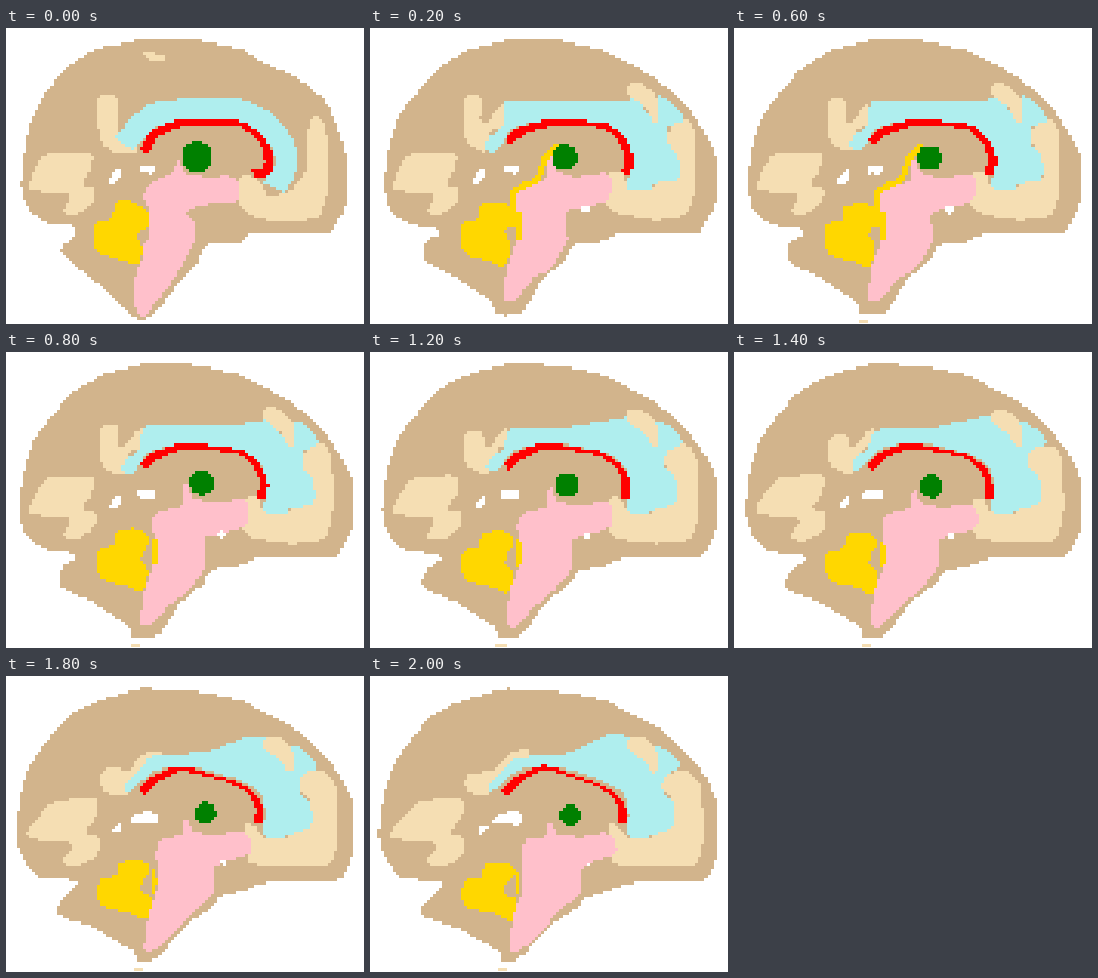
Write an HTML page with a canvas that moves like this. It is 358 px wide and 296 px high and loops after 2.2 s.

```html
<!DOCTYPE html>
<html lang="en">
<head>
<meta charset="utf-8">
<title>Brain slices</title>
<style>
html, body { margin: 0; width: 100%; height: 100%; overflow: hidden; background: #fff; }
canvas { display: block; }
</style>
</head>
<body>
<canvas id="stage" width="358" height="296"></canvas>
<script>
const ctx = document.getElementById('stage').getContext('2d');
const STEP = 200, STEPS = 11;
const TAN = '#d2b48c', WHEAT = '#f5deb3', BLUE = '#afeeee', RED = '#ff0000';
const GOLD = '#ffd700', PINK = '#ffc0cb', GREEN = '#008000', WHITE = '#ffffff';

// Voxel grid: origin and pitch on each axis.
const OX = 1.28, CX = 3.085, OY = 2.16, CY = 3.08, ROWS = 95;
const edgeX = k => Math.round(OX + CX * k);
const edgeY = k => Math.round(OY + CY * k);

const mix = (a, b, t) => a + (b - a) * t;
const box = (l, t, r, b) => [l, t, r, t, r, b, l, b];
const disc = (x, y, r) => Array.from({ length: 24 }, (_, i) =>
  (i % 2 ? y : x) + r * (i % 2 ? Math.sin : Math.cos)(Math.PI * (i >> 1) / 6));

// Key points drift between two slices, "from" and "to"; the opening slice may use "first".
// A part with a width is a ribbon around its centre line.
const parts = [
  { color: TAN,
    first: [135,12, 188,12, 235,21, 258,35, 285,47, 302,58, 320,74, 332,100, 340,130, 339,178, 330,196, 322,205, 242,206, 236,213, 200,217, 190,237, 170,258, 150,284, 134,291, 118,281, 90,254, 60,230, 55,220, 68,207, 66,198, 42,195, 22,180, 15,158, 20,112, 28,86, 42,62, 60,41, 88,22, 110,17],
    from: [140,12, 186,12, 235,23, 262,37, 286,51, 304,66, 320,83, 335,105, 346,130, 346,172, 337,192, 328,205, 250,206, 228,214, 203,217, 193,234, 172,252, 152,284, 126,286, 121,274, 84,248, 55,233, 56,212, 70,206, 64,200, 40,196, 20,182, 14.5,160, 17,128, 27,92, 44,68, 66,43, 98,22],
    to: [135,13, 190,16, 235,24, 256,36, 277,46, 296,57, 312,73, 333,97, 346,125, 347,175, 342,192, 333,204, 262,207, 240,214, 216,222, 208,231, 180,250, 152,280, 134,286, 129,276, 88,252, 50,239, 58,224, 72,208, 66,205, 32,202, 17,184, 8.5,160, 14,118, 22,92, 38,68, 58,43, 86,27] },
  { color: WHEAT,
    first: [303,92, 316,92, 323,120, 322,160, 313,188, 285,193, 258,191, 238,183, 228,160, 240,147, 256,156, 262,167, 284,163, 300,142],
    from: [303,94, 318,92, 325,108, 325,160, 316,186, 285,192, 243,184, 235,172, 237,148, 252,143, 259,160, 282,162, 286,153, 308,150, 306,128, 298,114],
    to: [298,98, 318,96, 331,110, 334,160, 325,189, 285,191, 246,188, 240,172, 240,148, 246,150, 258,161, 282,161, 288,156, 303,150, 303,126, 291,108] },
  { color: WHEAT,
    from: [24,161, 38,128, 84,126, 84,142, 77,157, 88,161, 86,174, 71,186, 58,184, 62,166],
    to: [20,160, 48,127, 90,122, 92,138, 82,157, 94,163, 92,178, 74,190, 57,186, 66,168] },
  { color: WHEAT,
    first: [92,70, 111,70, 111,98, 120,116, 132,122, 112,126, 94,112],
    from: [95,70, 111,70, 113,96, 132,77, 136,96, 119,104, 127,116, 112,124, 95,110],
    to: [97,100, 114,96, 122,95, 140,78, 160,77, 140,88, 126,106, 118,119, 98,115] },
  { color: BLUE, until: 0, width: () => 23,
    from: [118,116, 132,100, 150,86, 185,82, 230,82, 258,94, 276,115, 280,138, 268,160] },
  { color: BLUE, since: 1,
    from: [118,110, 134,97, 137,73, 200,73, 258,73, 264,66, 286,94, 289,68, 313,90, 298,100, 298,115, 308,130, 307,152, 286,155, 278,163, 258,160, 262,140, 258,116, 242,100, 195,92, 165,94, 140,103, 128,122, 118,123],
    to: [119,108, 132,95, 148,82, 200,77, 238,58, 262,62, 285,95, 287,70, 311,89, 297,98, 292,112, 303,128, 303,150, 286,159, 276,161, 258,159, 259,138, 254,118, 235,106, 200,94, 172,90, 148,95, 128,110, 119,116] },
  { color: WHEAT,
    first: [139,24, 158,28, 158,33, 140,30],
    from: [260,55, 272,56, 287,70, 287,95, 275,80, 259,66],
    to: [257,65, 272,61, 286,74, 286,96, 274,86, 258,72] },
  { color: RED, width: (u, t) => 5 - 3 * t + (5 + 2 * t) * Math.abs(2 * u - 1),
    first: [138,124, 148,107, 170,96, 200,94, 232,95, 252,108, 262,126, 261,142, 247,146],
    from: [138,114, 150,104, 170,97, 195,94, 235,98, 252,112, 259,130, 256,146],
    to: [134,117, 152,101, 175,92, 200,99, 225,108, 243,118, 252,132, 253,146] },
  { color: GOLD,
    first: [112,173, 127,174, 143,187, 141,199, 131,206, 136,220, 131,236, 112,231, 90,222, 89,196, 105,190],
    from: [110,178, 130,174, 143,183, 140,197, 135,205, 141,218, 134,238, 117,233, 94,224, 92,196, 107,191],
    to: [116,188, 138,187, 145,197, 135,208, 136,218, 146,222, 143,244, 126,238, 95,230, 94,206, 112,201] },
  { color: PINK,
    first: [168,143, 172,132, 180,145, 203,149, 229,150, 230,172, 203,176, 180,185, 190,194, 189,213, 175,240, 158,264, 138,288, 130,284, 128,252, 136,232, 137,216, 143,208, 143,182, 138,170, 142,158],
    from: [176,150, 180,128, 187,142, 207,149, 238,146, 239,170, 215,180, 196,185, 197,212, 182,240, 163,250, 145,273, 134,271, 137,240, 147,210, 148,185, 144,172, 150,161, 168,155],
    to: [176,160, 181,146, 188,158, 212,161, 238,158, 246,176, 222,186, 211,194, 210,216, 190,234, 168,260, 145,277, 139,273, 144,240, 152,215, 152,190, 152,178, 156,164, 168,162] },
  { color: GOLD, since: 1, from: box(146, 184, 151, 210), to: box(146, 197, 150, 218) },
  { color: GOLD, since: 1, until: 3, width: () => 6,
    from: [142,200, 144,165, 168,150, 175,130, 190,117] },
  { color: GREEN, first: disc(191, 129, 15), from: disc(195, 129, 12.5), to: disc(200, 139, 10.5) },
  { color: WHITE, from: [103,154, 113,141, 114,151, 107,156], to: [108,154, 116,148, 117,152, 111,158] },
  { color: WHITE,
    from: [134,142, 134,138, 147,138, 147,145, 140,145, 134,145],
    to: [122,148, 130,138, 151,137, 151,148, 138,147, 128,146] },
  { color: WHITE, since: 1, from: box(211, 178, 219, 184), to: box(217, 186, 220, 189) },
  { color: WHEAT, since: 2, until: 4, from: box(125, 292, 134, 295) },
  { color: WHEAT, since: 5, until: 6, from: box(125, 292, 137, 295) },
  { color: WHEAT, since: 7, from: box(128, 292, 137, 295) }
];

// Curve through the key points; short handles keep corners crisp.
function smooth(flat, closed) {
  const n = flat.length / 2, out = [];
  const at = i => {
    const k = closed ? (i + n) % n : Math.max(0, Math.min(n - 1, i));
    return [flat[2 * k], flat[2 * k + 1]];
  };
  const heading = i => {
    const [x, y] = at(i - 1), [u, v] = at(i + 1), d = Math.hypot(u - x, v - y) || 1;
    return [(u - x) / d, (v - y) / d];
  };
  for (let i = 0; i < (closed ? n : n - 1); i++) {
    const p = at(i), q = at(i + 1), a = heading(i), b = heading(i + 1);
    const h = Math.min(6, 0.3 * Math.hypot(q[0] - p[0], q[1] - p[1]));
    for (let s = 0; s < 1; s += 0.125) {
      const r = 1 - s;
      out.push([0, 1].map(k => r * r * r * p[k] + 3 * r * r * s * (p[k] + h * a[k]) +
        3 * r * s * s * (q[k] - h * b[k]) + s * s * s * q[k]));
    }
  }
  if (!closed) out.push(at(n - 1));
  return out;
}

function ribbon(line, width) {
  const last = line.length - 1, sides = [[], []];
  line.forEach(([x, y], i) => {
    const p = line[Math.max(0, i - 1)], q = line[Math.min(last, i + 1)];
    const dx = q[0] - p[0], dy = q[1] - p[1];
    const k = width(i / last) / 2 / Math.hypot(dx, dy);
    sides[0].push([x - dy * k, y + dx * k]);
    sides[1].unshift([x + dy * k, y - dx * k]);
  });
  return sides.flat();
}

// Fill every voxel whose centre lies inside the outline.
function fill(pts, color) {
  ctx.fillStyle = color;
  for (let row = 0; row < ROWS; row++) {
    const y = OY + CY * (row + 0.5), hits = [];
    pts.forEach(([x0, y0], i) => {
      const [x1, y1] = pts[(i + 1) % pts.length];
      if (y0 > y !== y1 > y) hits.push(mix(x0, x1, (y - y0) / (y1 - y0)));
    });
    hits.sort((a, b) => a - b);
    for (let i = 0; i < hits.length; i += 2) {
      const [l, r] = [hits[i], hits[i + 1]].map(x => edgeX(Math.ceil((x - OX) / CX - 0.5)));
      if (r > l) ctx.fillRect(l, edgeY(row), r - l, edgeY(row + 1) - edgeY(row));
    }
  }
}

function draw(step) {
  const t = (Math.max(0, step - 1) / (STEPS - 2)) ** 1.5;
  ctx.fillStyle = WHITE;
  ctx.fillRect(0, 0, 358, 296);
  for (const { color, from, to = from, first = from, since = 0, until = STEPS, width } of parts) {
    if (step < since || step > until) continue;
    const keys = step ? from.map((v, i) => mix(v, to[i], t)) : first;
    const curve = smooth(keys, !width);
    fill(width ? ribbon(curve, u => width(u, t)) : curve, color);
  }
}

let shown = -1;
function tick() {
  const step = Math.floor(performance.now() / STEP) % STEPS;
  if (step !== shown) draw(shown = step);
  requestAnimationFrame(tick);
}
tick();
</script>
</body>
</html>
```
